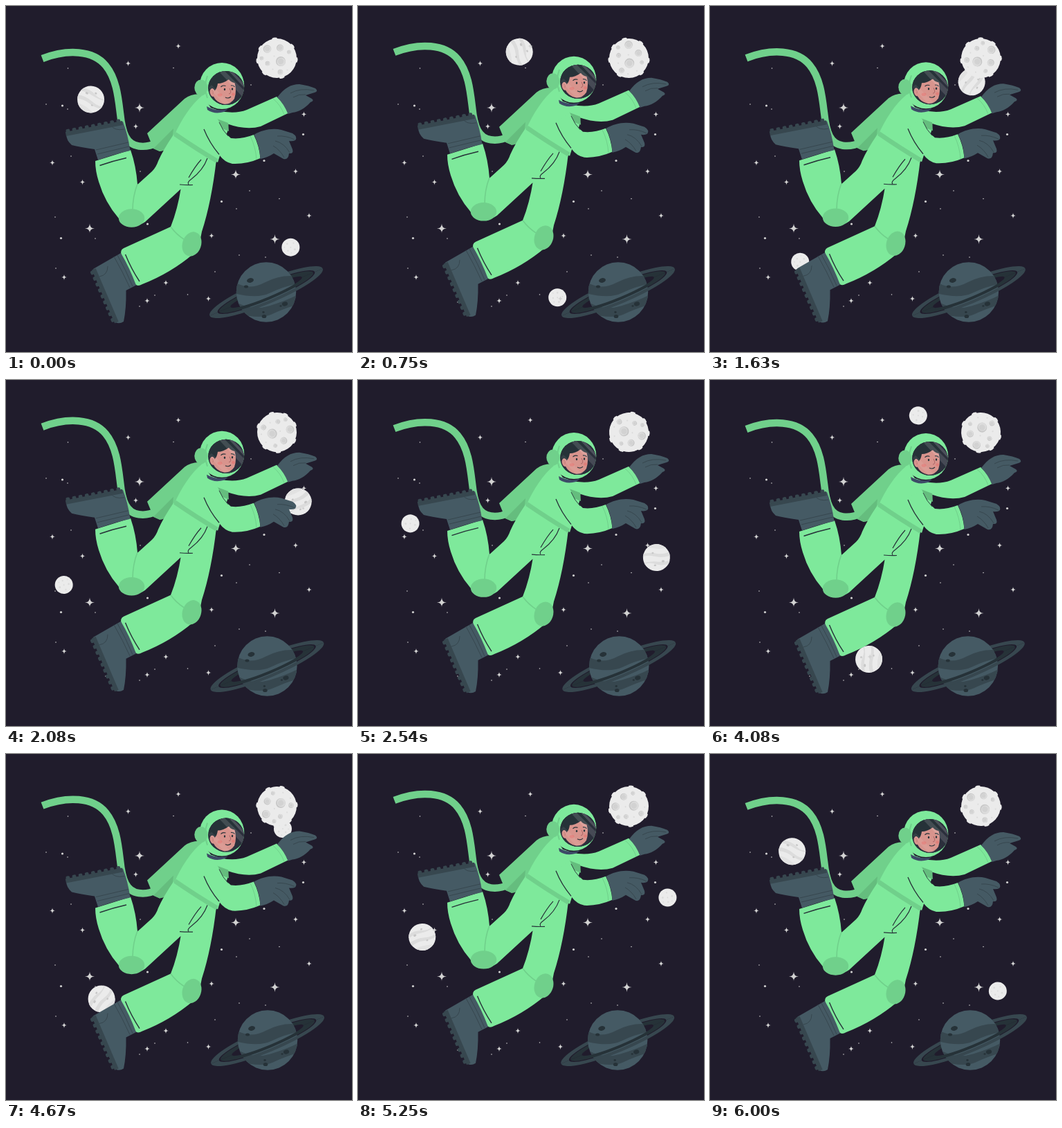
Recreate the animation shown at these times as an HTML page with a canvas. Size 500 px wide and 500 px high, loop 6040 ms.

```html
<!DOCTYPE html>
<html lang="en">
<head>
<meta charset="utf-8">
<title>Spacewalk</title>
<style>
html, body { margin: 0; width: 100%; height: 100%; overflow: hidden; background: #201c2c; }
canvas { display: block; width: 100%; height: 100%; }
</style>
</head>
<body>
<canvas id="stage" width="500" height="500"></canvas>
<script>
const ctx = document.getElementById('stage').getContext('2d');
const LOOP = 6040, TAU = Math.PI * 2, RAD = Math.PI / 180;
const C = {
  sky: '#201c2c', suit: '#7ee99b', shade: '#70d08b', deep: '#65bd7e',
  slate: '#455a64', dusk: '#37474f', ink: '#263238',
  pale: '#ebebeb', mist: '#dcdcdc', grey: '#c7c7c7', skin: '#d8948d', star: '#d2d2d2'
};

function fill(d, color) {
  ctx.fillStyle = color;
  ctx.fill(new Path2D(d));
}
function line(d, color, width = 1) {
  ctx.strokeStyle = color;
  ctx.lineWidth = width;
  ctx.stroke(new Path2D(d));
}
function oval(x, y, rx, ry, color, turn = 0) {
  ctx.fillStyle = color;
  ctx.beginPath();
  ctx.ellipse(x, y, rx, ry, turn * RAD, 0, TAU);
  ctx.fill();
}
const disc = (x, y, r, color) => oval(x, y, r, r, color);

function within(x, y, rx, ry, draw) {
  ctx.save();
  ctx.beginPath();
  ctx.ellipse(x, y, rx, ry, 0, 0, TAU);
  ctx.clip();
  draw();
  ctx.restore();
}
function group(x, y, turn, draw) {
  ctx.save();
  ctx.translate(x, y);
  ctx.rotate(turn * RAD);
  draw();
  ctx.restore();
}

// Stars
const bigStars = [[193, 147], [121, 321.5], [332, 243.5], [388.5, 337]];
const smallStars = [[249, 58], [176.5, 83], [187.5, 174], [67, 226.5], [110.5, 254.5], [84, 392],
  [231, 400], [204, 426], [292.5, 423], [297, 332], [438, 303], [418.5, 239], [430.5, 156.5]];
const bigDots = [[81.5, 144], [204.5, 315], [79.5, 335.5], [311.5, 282.5], [373, 223.5], [429.5, 185.5]];
const smallDots = [[89.5, 90], [58, 142], [89, 149], [94, 217], [194, 239], [71, 305], [129, 336],
  [72, 379], [215, 418], [193, 434], [144, 428], [262.5, 417], [302, 384], [337, 360], [375, 363],
  [333, 293], [352, 267], [395, 278.5], [354, 114], [242, 89.5]];

function star(x, y, r) {
  const k = r * 0.03;
  ctx.fillStyle = C.star;
  ctx.beginPath();
  ctx.moveTo(x, y - r);
  ctx.quadraticCurveTo(x + k, y - k, x + r, y);
  ctx.quadraticCurveTo(x + k, y + k, x, y + r);
  ctx.quadraticCurveTo(x - k, y + k, x - r, y);
  ctx.quadraticCurveTo(x - k, y - k, x, y - r);
  ctx.fill();
}
function stars() {
  bigStars.forEach(([x, y]) => star(x, y, 7));
  smallStars.forEach(([x, y]) => star(x, y, 4.2));
  bigDots.forEach(([x, y]) => disc(x, y, 1.6, C.star));
  smallDots.forEach(([x, y]) => disc(x, y, 0.8, C.star));
}

// Planets
function bandedPlanet() {
  disc(0, 0, 19.5, C.pale);
  within(0, 0, 19.5, 19.5, () => {
    ctx.rotate(24 * RAD);
    fill('M-22,-9 Q-8,-14 3,-9 T22,-11 V-7 Q10,-4 0,-6 T-22,-5Z', C.mist);
    fill('M-22,2 Q-9,-2 3,2 T22,1 V6 Q10,9 0,6 T-22,8Z', C.mist);
    fill('M-22,14 Q-8,10 4,14 T22,13 V22 H-22Z', '#e2e2e2');
    oval(-9, -6, 2.2, 1.6, C.grey);
    oval(3, -11, 1.7, 1.3, C.grey);
    oval(5, 7, 1.5, 1.2, C.grey);
  });
}
function tinyPlanet() {
  disc(0, 0, 13, C.pale);
  [[-5, -5, 1.4], [4, -6, 1.1], [6, 3, 1.5], [-4, 5, 1.2], [0, 0, 1], [1, 8, 0.9], [-9, 0, 0.8]]
    .forEach(([x, y, r]) => disc(x, y, r, C.mist));
}
function crater(x, y, r) {
  disc(x, y, r, C.grey);
  disc(x + r * 0.1, y + r * 0.1, r * 0.88, C.mist);
  disc(x, y, r * 0.6, '#d2d2d2');
}
function moon() {
  disc(0, 0, 28.5, C.pale);
  [-97, -148, 172, 130, 75, 5, -38].forEach(a => group(0, 0, a, () => {
    fill('M26,-4 L29.5,-3.500 Q31,0 29.5,3.500 L26,4Z', C.pale);
  }));
  [[5.5, 4.5, 7], [-14, -13.5, 5.8], [4.5, -15, 5], [-22, 0, 2.8], [-13.5, 7.5, 3.3],
    [5, 20, 3.8], [17.5, -9, 2.8]].forEach(c => crater(...c));
  [[-4, -3], [-6, 16], [15, 17], [21, 5]].forEach(([x, y]) => disc(x, y, 1.1, C.mist));
}

function ringBand(rx, ry, hx, hy, color, from, to) {
  ctx.fillStyle = color;
  ctx.beginPath();
  ctx.ellipse(0, 0, rx, ry, 0, from, to);
  ctx.ellipse(0, 0, hx, hy, 0, to, from, true);
  ctx.fill();
}
function ringHalf(from, to) {
  group(0, 0, -22.6, () => {
    ringBand(88.5, 17, 76, 12.6, C.dusk, from, to);
    ringBand(73.5, 11.6, 56, 7.6, C.ink, from, to);
  });
}
function ringedPlanet(x) {
  group(x, 413.5, 0, () => {
    ringHalf(Math.PI, TAU);
    disc(0, 0, 43.2, C.slate);
    within(0, 0, 43.2, 43.2, () => {
      fill('M-45,-14 Q-24,-2 -2,-14 T45,-23 V-12 Q24,-8 6,1 T-45,2Z', C.dusk);
      fill('M-45,13 Q-22,28 4,20 T45,4 V18 Q25,24 8,32 T-45,30Z', C.dusk);
      oval(-23, -17, 5, 3.4, C.ink, -12);
      oval(-29, -8, 3, 2, C.ink);
      oval(27, 17, 4.2, 3, C.ink, -15);
      oval(21, 20, 1.6, 1.3, C.ink);
      oval(-3, 35, 3.3, 2.6, C.ink);
      oval(-4, 29, 1.7, 1.4, C.ink);
    });
    ringHalf(0, Math.PI);
  });
}

// Astronaut
function sole(x1, y1, x2, y2, side) {
  const len = Math.hypot(x2 - x1, y2 - y1);
  group(x1, y1, Math.atan2(y2 - y1, x2 - x1) / RAD, () => {
    ctx.fillStyle = C.dusk;
    ctx.fillRect(0, side < 0 ? -1 : -5, len, 6);
    const n = 9, step = len / n;
    for (let i = 0; i < n; i++) {
      ctx.beginPath();
      ctx.roundRect(i * step + 1, side < 0 ? -4.5 : -1, step * 0.62, 5.5, 2);
      ctx.fill();
    }
  });
}
function backLeg() {
  fill('M129,224 L180,208 Q188,231 190,258 L211,239 Q217,233 220,224 Q227,208 242,186 L306,220 L270,260 L252,265 L201,312 Q183,325 163,307 Q143,284 134,254 Q129,238 129,224Z', C.suit);
  line('M190,257 Q183,275 183,296', C.shade, 1.6);
  oval(181.5, 306.5, 18.7, 13.2, C.shade);
  line('M135.500,230.500 Q154,224 174,219.500', C.ink, 1.4);
  fill('M87,185 L169,167 Q176,185 179.500,209 Q157,214 133,222.500 L128,207 Q107,204 95,201 Q87,194 87,185Z', C.slate);
  sole(86, 183, 168, 167, -1);
  line('M130,208 L177,197 M132,214 L178,203', C.dusk, 1);
  line('M151,172 Q157,181 171,178', C.dusk, 1);
}
function frontLeg() {
  fill('M253,262 Q248,294 238,319 L170,350 Q164,353 167,361 L187,402 Q190,406 197,402 Q238,386 271,358 Q280,346 283,326 Q297,283 304,222 Q290,225 272,235Z', C.suit);
  line('M238,319 Q246,330 257,337', C.shade, 1.6);
  oval(268.5, 344, 13.5, 18, C.shade, 18);
  line('M172.500,359 Q181,380 193,398', C.ink, 1.4);
  fill('M126,380 L166,357 Q179,379 188,403.500 L173.500,411 Q174,437 170,456 Q164,460 158,457Z', C.slate);
  sole(125, 381, 158, 458, 1);
  line('M156,362 Q169,385 179,407 M161,360 Q173,381 183,405', C.dusk, 1);
  line('M135,391 Q147,389 147,376', C.dusk, 1);
}
function head() {
  fill('M290,145 Q304,153 321,149 L315,153 Q301,157 291,150Z', '#3d4a67');
  oval(312, 115.5, 32.3, 33.5, C.suit);
  oval(281.8, 118, 9.5, 11.5, C.shade);
  line('M291,101 Q285,117 291,133', C.shade, 2);
  oval(318, 118.5, 25.8, 24.5, C.ink);
  within(318, 118.5, 25.8, 24.5, () => {
    fill('M290,92 H346 V146 H290Z', '#2b2f3c');
    fill('M302,120 L306,108 Q319,103 330,109 Q334,123 330,134 Q324,143 314,141.500 Q304,139 300,131Z', C.skin);
    oval(298.5, 125, 3.8, 6, C.skin, -12);
    line('M297,122 Q300,122 299,127', '#b86f6d', 0.8);
    fill('M293,120 Q292,96 315,93 Q332,94 334,111 Q326,112 322,106 Q314,112 306,112 Q305,119 302,122 Q298,116 295,121Z', C.ink);
    oval(309, 128.5, 3.4, 2.3, '#e0807b');
    oval(328.5, 127.5, 2.4, 2.2, '#e0807b');
    oval(316, 120.5, 1.2, 1.7, C.ink);
    oval(327, 120, 1.2, 1.7, C.ink);
    line('M310.500,117 Q313,114 317.500,115.500 M325,115 Q328,114 330.500,117', C.ink, 1.2);
    line('M323,119 Q327,126.500 322,127', '#a65f60', 0.9);
    line('M317,132 Q321,134.500 325,131', C.ink, 1.1);
    fill('M309,96 L314,92 L348,126 L346,136Z', 'rgba(255,255,255,.13)');
    fill('M319,91 L323,90 L350,119 L349,123Z', 'rgba(255,255,255,.16)');
    fill('M293,118 L297,114 L326,143 L318,145Z', 'rgba(255,255,255,.07)');
  });
}
function arms() {
  // far arm
  fill('M306,151 Q330,157 348,150 L391,131 Q402,140 407.500,155 L368,174 Q347,180 319,170Z', C.suit);
  line('M386,134 Q397,143 402,157', C.shade, 1);
  fill('M392,132 C402,119 411,113 424,113 Q438,115 447,119 Q452,123 446,125 L433,129 L442,134 Q446,137 440,139 C432,148 423,153 414,154 L407.500,156 Q402,142 392,132Z', C.slate);
  line('M411,126 Q425,118 445,122 M415,132 Q423,127 433,128', C.dusk, 1);

  // near arm
  fill('M305,163 L321,169 L322,181 L312,177Z', C.deep);
  fill('M286,176 L306,163 Q314,183 325,191 Q340,193 358,186 Q366,202 367.500,220 Q347,229 327,228 Q316,226 308,215Z', C.suit);
  line('M286,178 Q294,198 308,214.500', C.ink, 1.3);
  line('M308,168 Q313,180 321,188', C.ink, 0.9);
  line('M353,188 Q361,204 362,222', C.shade, 1);
  fill('M358.500,186 C370,179 385,176 398,179 L414,184 Q422,189 418,194 Q414,196 409,195 L414,207 Q416,214 409,213 Q408,223 401,221 L387,213 Q378,219 367.500,221 Q367,203 358.500,186Z', C.slate);
  line('M392,188 Q404,187 417,193 M389,195 Q402,198 410,212 M386,202 Q396,208 402,219', C.dusk, 1);
}
function astronaut(y) {
  group(0, y, 0, () => {
    line('M52.500,76 C89,62 126,64 144,86 C159,104 162,130 165,155 C168,184 174,200 192,202.500 C204,204 212,201 222,196', C.shade, 10.5);
    fill('M204,184 L258,134 Q270,125 286,128 L284,152 L240,198 Q233,209 222,210 L213,206Z', C.shade);
    fill('M213,206 L242,177 L240,196 Q233,209 222,210Z', C.deep);
    backLeg();
    frontLeg();
    fill('M284,129 L296,147 Q310,152 322,155 L321,178 L306,226 L243,188 C253,164 268,142 284,129Z', C.suit);
    line('M244,185 Q276,207 305,224', C.shade, 6.5);
    line('M291,220 Q285,237 268,250 Q261,255 264,258 M282,222 Q273,232 264,248', C.ink, 1.2);
    line('M251,258 Q261,259 270,258.500', C.ink, 1.2);
    arms();
    head();
  });
}

// Timing
function orbitTurn(t) {
  const u = t / LOOP;
  return 360 * u + 2 * Math.max(0, -Math.sin(TAU * u));
}
function sway(t) {
  const u = (t - 735) / 5000;
  return u < 0 || u > 1 ? 0 : 4.1 * Math.sin(Math.PI * u) * Math.sin(TAU * 4 * u);
}
const bob = t => -4.6 * (1 - Math.cos(TAU * t / 1492));

function draw(t) {
  const turn = orbitTurn(t);
  ctx.fillStyle = C.sky;
  ctx.fillRect(0, 0, 500, 500);
  group(261.5, 235.2, turn, () => {
    group(-139, -100, 0, bandedPlanet);
    group(150, 113.3, 0, tinyPlanet);
  });
  group(391.5, 75.5, turn, moon);
  ringedPlanet(376 + sway(t));
  stars();
  astronaut(bob(t));
}

const start = performance.now();
function tick(now) {
  draw(Math.max(0, now - start) % LOOP);
  requestAnimationFrame(tick);
}
draw(0);
requestAnimationFrame(tick);
</script>
</body>
</html>
```
